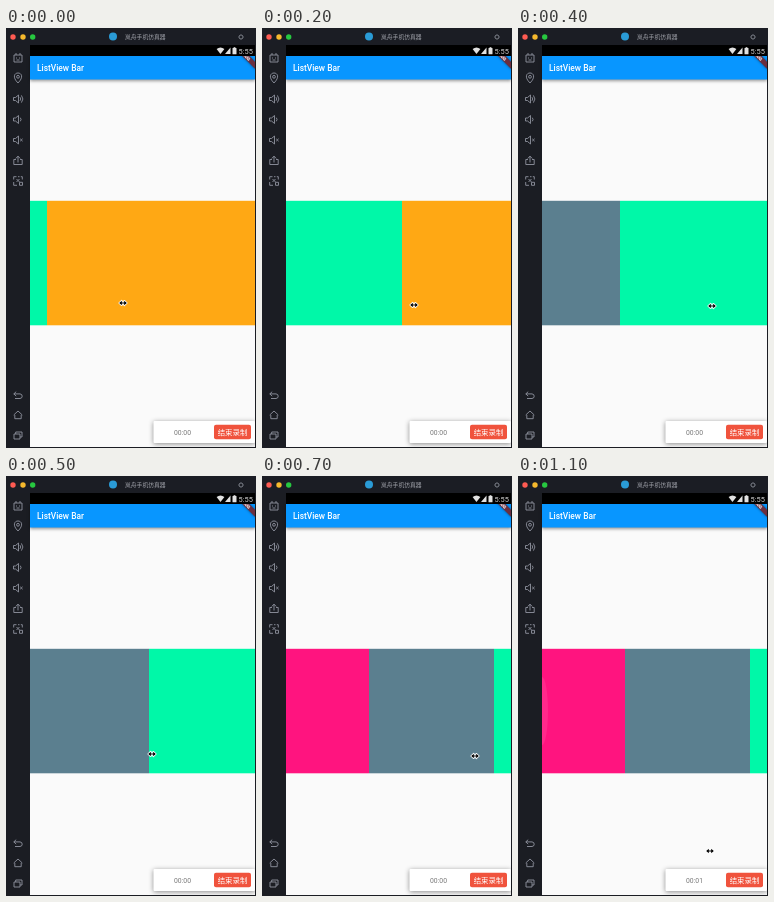
An HTML page with a canvas for the animation above (1.2 s loop, 250 by 420 pixels).

```html
<!DOCTYPE html>
<html lang="zh">
<head>
<meta charset="utf-8">
<title>ListView Bar</title>
<style>
html, body { margin: 0; width: 100%; height: 100%; overflow: hidden; background: #1b1d23; }
canvas { display: block; width: 250px; height: 420px; }
</style>
</head>
<body>
<canvas id="stage"></canvas>
<script>
const W = 250, H = 420, LOOP = 1200, STEP = 100;
const canvas = document.getElementById('stage');
const ctx = canvas.getContext('2d');
const ratio = window.devicePixelRatio || 1;
canvas.width = W * ratio;
canvas.height = H * ratio;

const CJK = '"Noto Sans CJK SC", "Noto Sans CJK", sans-serif';
const SANS = 'Roboto, sans-serif';
const ICON = '#9093a0';

// Tiles from left to right; the list rests with the first at x = 24.
const TILES = [['#ff147f', 83], ['#5b7f8f', 125], ['#00f8a8', 167], ['#ffa814', 208]];

// [time, list shift]
const SCROLL = [[0, -358], [100, -310], [200, -259], [300, -190], [400, -130],
  [500, -89], [600, -65], [700, 0], [1200, 0]];
// [time, x, y]
const POINTER = [[0, 117, 275], [200, 152, 277], [400, 194, 278], [600, 98, 278],
  [700, 213, 280], [900, 101, 283], [1100, 192, 375], [1200, 192, 375]];

function at(keys, t, i = 1) {
  let n = 1;
  while (n < keys.length - 1 && t > keys[n][0]) n++;
  const a = keys[n - 1], b = keys[n];
  return a[i] + (b[i] - a[i]) * (t - a[0]) / (b[0] - a[0]);
}

function rect(x, y, w, h, color) {
  ctx.fillStyle = color;
  ctx.fillRect(x, y, w, h);
}

function round(x, y, w, h, r, color) {
  ctx.fillStyle = color;
  ctx.beginPath();
  ctx.roundRect(x, y, w, h, r);
  ctx.fill();
}

function disc(x, y, r, color) {
  ctx.fillStyle = color;
  ctx.beginPath();
  ctx.arc(x, y, r, 0, Math.PI * 2);
  ctx.fill();
}

function text(s, x, y, font, color, align = 'left') {
  ctx.font = font;
  ctx.fillStyle = color;
  ctx.textAlign = align;
  ctx.fillText(s, x, y);
}

function shadow(color, blur, dy) {
  ctx.shadowColor = color;
  ctx.shadowBlur = blur * ratio;
  ctx.shadowOffsetY = dy * ratio;
}

function line(d, x, y, fill) {
  ctx.save();
  ctx.translate(x, y);
  ctx.lineWidth = 0.9;
  ctx.strokeStyle = ctx.fillStyle = ICON;
  const p = new Path2D(d);
  if (fill) ctx.fill(p); else ctx.stroke(p);
  ctx.restore();
}

function titleBar() {
  rect(0, 0, W, 17, '#1b1d24');
  disc(7, 9, 2.7, '#fe5b52');
  disc(17, 9, 2.7, '#f6b92d');
  disc(26.7, 9, 2.7, '#27c840');
  disc(107, 8.5, 4, '#2a9bd6');
  text('岚舟手机仿真器', 119, 11, '5.8px ' + CJK, '#a3a5ad');
  ctx.strokeStyle = '#7d8089';
  ctx.lineWidth = 0.8;
  ctx.beginPath();
  ctx.arc(235, 9, 1.9, 0, 7);
  for (let i = 0; i < 8; i++) {
    const c = Math.cos(i * Math.PI / 4), s = Math.sin(i * Math.PI / 4);
    ctx.moveTo(235 + c * 1.9, 9 + s * 1.9);
    ctx.lineTo(235 + c * 2.8, 9 + s * 2.8);
  }
  ctx.stroke();
}

function sideBar() {
  rect(0, 17, 24, H - 17, '#1b1d23');
  const speaker = 'M-4.5-1.5h2l3-2.5v8l-3-2.5h-2z';
  line('M-4-3h8v7h-8zM-2-5v2M2-5v2M-2 0h1M1 0h1M-1.5 2h3', 12, 30);
  line('M0 5C-6-1-3.5-5 0-5S6-1 0 5zM-1.4-1.2a1.4 1.4 0 1 0 2.8 0a1.4 1.4 0 1 0-2.8 0', 12, 50);
  line(speaker + 'M2-1.8q1.5 1.8 0 3.6M3.4-3.6q3 3.6 0 7.2', 12, 71);
  line(speaker + 'M2.3-1.8q1.5 1.8 0 3.6', 12, 91.5);
  line(speaker + 'M2.2-1.2l2.4 2.4M4.6-1.2l-2.4 2.4', 12, 112);
  line('M-2-1h-2.2v5h8.4v-5h-2.2M0 2v-6M-2.2-2l2.2-2.4l2.2 2.4', 12, 132.5);
  line('M-4.3-1.5v-2.8h2.8M0-4.3h1.5M4.3-1.5v-2.8h-1.5M-4.3 1v3.3h3.3M-1.5-2l3 3M1.5-2l-3 3M1.5 1.3h3v3h-3z', 12, 153);
  line('M-1.8-3.8l-2.4 2.2l2.4 2.2M-4.2-1.6h6.2q2.2.2 2.2 2.3t-2.2 2.3h-5', 12, 367.5);
  line('M-4.3 0l4.3-4l4.3 4M-3.2 0v3.7h6.4v-3.7', 12, 387);
  line('M-4-1.5h6v5h-6zM-2.3-1.5v-2h6.3v5h-2', 12, 407.5);
}

function statusBar() {
  rect(24, 17, 225, 11, '#000');
  ctx.fillStyle = '#e2e2e2';
  ctx.beginPath();
  ctx.moveTo(214.5, 26);
  ctx.lineTo(210.6, 21);
  ctx.quadraticCurveTo(214.5, 18, 218.4, 21);
  ctx.fill();
  ctx.beginPath();
  ctx.moveTo(219, 26);
  ctx.lineTo(224.5, 26);
  ctx.lineTo(224.5, 19.6);
  ctx.fill();
  round(226.5, 20, 4, 6.2, 0.5, '#e2e2e2');
  rect(227.6, 19.2, 1.8, 1, '#e2e2e2');
  text('5:55', 232.6, 26, '7.4px ' + SANS, '#d2d2d2');
}

function appBar() {
  ctx.save();
  shadow('rgba(0,0,0,.4)', 3, 1.2);
  rect(24, 28, 225, 23.5, '#0896ff');
  ctx.restore();
  text('ListView Bar', 31, 43, '500 8.4px ' + SANS, '#fff');

  ctx.save();
  ctx.beginPath();
  ctx.rect(24, 28, 225, 30);
  ctx.clip();
  ctx.translate(249, 17);
  ctx.rotate(Math.PI / 4);
  ctx.save();
  shadow('rgba(0,0,0,.5)', 2.5, 0);
  rect(-17, 11.8, 34, 5, '#6b2f40');
  ctx.restore();
  text('DEBUG', 0, 15.9, '900 4.3px ' + SANS, '#fff', 'center');
  ctx.restore();
}

function list(t) {
  ctx.save();
  ctx.beginPath();
  ctx.rect(24, 172.6, 225, 125);
  ctx.clip();
  let x = 24 + at(SCROLL, t);
  for (const [color, w] of TILES) {
    rect(x, 172.6, w, 125, color);
    x += w;
  }
  // Overscroll glow at the left edge
  if (t >= 1000) {
    ctx.fillStyle = 'rgba(255,255,255,.09)';
    ctx.beginPath();
    ctx.ellipse(24, 235, t < 1100 ? 10 : 6, t < 1100 ? 50 : 34, 0, 0, 7);
    ctx.fill();
  }
  ctx.restore();
}

function recorder(t) {
  ctx.save();
  shadow('rgba(0,0,0,.45)', 5, 1);
  round(147.5, 393, 101.5, 22, 1, '#fff');
  ctx.restore();
  text(t < 900 ? '00:00' : '00:01', 176.5, 406.5, '6.8px ' + SANS, '#777', 'center');
  round(208, 396.7, 37, 14.6, 2, '#f0533d');
  text('结束录制', 226.5, 406.8, '7.4px ' + CJK, '#fff', 'center');
}

function pointer(t) {
  ctx.save();
  ctx.translate(at(POINTER, t, 1), at(POINTER, t, 2));
  if (t === 600 || t === 900) {
    disc(0, 0, 7.6, 'rgba(95,95,105,.4)');
    ctx.strokeStyle = 'rgba(205,205,210,.65)';
    ctx.lineWidth = 0.8;
    ctx.stroke();
  }
  const arrow = new Path2D('M-3.8 0L-1.2-2.3V-.6H1.2V-2.3L3.8 0L1.2 2.3V.6H-1.2V2.3Z');
  ctx.lineJoin = 'round';
  ctx.lineWidth = 1.6;
  ctx.strokeStyle = '#fff';
  ctx.stroke(arrow);
  ctx.fillStyle = '#000';
  ctx.fill(arrow);
  ctx.restore();
}

function draw(now) {
  const t = Math.floor((now % LOOP) / STEP) * STEP;
  ctx.setTransform(ratio, 0, 0, ratio, 0, 0);
  rect(0, 0, W, H, '#1b1d23');
  titleBar();
  sideBar();
  rect(24, 28, 225, 391, '#fafafa');
  list(t);
  appBar();
  statusBar();
  recorder(t);
  pointer(t);
}

let start;
function tick(now) {
  if (start === undefined) start = now;
  draw(Math.max(0, now - start));
  requestAnimationFrame(tick);
}
draw(0);
requestAnimationFrame(tick);
</script>
</body>
</html>
```
